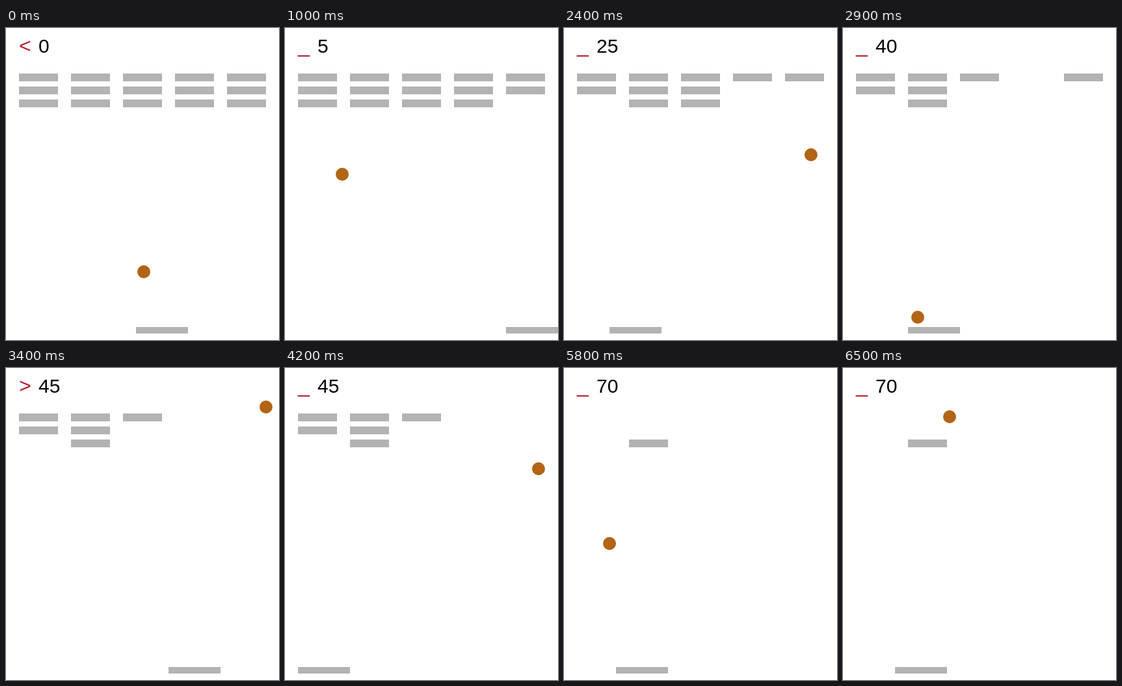
Recreate the animation shown at these times as an HTML page with a canvas. Size 420 by 480 pixels, loop 6.6 s.

```html
<!DOCTYPE html>
<html lang="en">
<head>
<meta charset="utf-8">
<title>Brick game</title>
<style>
  html, body { margin: 0; width: 420px; height: 480px; overflow: hidden; background: #fff; }
  canvas { display: block; }
</style>
</head>
<body>
<canvas id="stage" width="420" height="480"></canvas>
<script>
const ctx = document.getElementById('stage').getContext('2d');
const W = 420, H = 480, R = 10;
const STEP = 100, STEPS = 66, TICKS = 20, DELAY = 8;
const GREY = '#b3b3b3', BALL = '#b36415', RED = '#b22230';
const BRICK = { w: 60, h: 12 };

// Sideways speed the bat gives the ball at each return
const returns = [2.305, -4.89, 2, 5, -5, 5, -2, 5];

// The player's moves: [step, where the bat goes]
const BAT_SPEED = 60;
const moves = [
  [0, 160], [3, 300], [8.5, 340], [12, 300], [17, 120], [21.6, 70],
  [26, 100], [31.5, 260], [34.2, 0], [38.6, 20], [47.5, 120], [57, 80]
];

function batAt(t) {
  let x = 200;
  for (const [start, goal] of moves) {
    if (t < start) break;
    const dir = Math.sign(goal - x), run = (t - start) * BAT_SPEED;
    if (run < Math.abs(goal - x)) return { x: Math.round((x + dir * run) / 10) * 10, dir };
    x = goal;
  }
  return { x, dir: 0 };
}

function newGame() {
  const bricks = [];
  for (let r = 0; r < 3; r++)
    for (let c = 0; c < 5; c++) bricks.push({ x: 20 + 80 * c, y: 70 + 20 * r });
  return { x: 212, y: 375, vx: -0.2, vy: 5, bricks, score: 0, returned: 0 };
}

function touches(ball, brick) {
  return ball.x > brick.x - R && ball.x < brick.x + BRICK.w + R &&
         ball.y > brick.y - R && ball.y < brick.y + BRICK.h + R;
}

// At a wall the ball turns instead of moving along that axis.
function advance(g) {
  const x = g.x + g.vx, y = g.y + g.vy;
  if (x < R || x > W - R) g.vx *= -1; else g.x = x;
  if (y < R) g.vy *= -1; else g.y = y;

  g.bricks = g.bricks.filter(brick => {
    if (!touches(g, brick)) return true;
    g.vy *= -1;
    g.score += 5;
    return false;
  });

  if (g.y >= 455) {
    g.vy = -5;
    g.vx = returns[g.returned++];
    g.x = Math.round(g.x);
  }
}

// Play once and keep the state at every step.
const game = newGame();
const states = [];
for (let tick = -DELAY; states.length < STEPS; tick++) {
  if (tick > 0) advance(game);
  if ((tick + DELAY) % TICKS === 0) states.push({ ...game });
}

function text(string, x, size, color) {
  ctx.font = `${size}px "Liberation Sans", Arial, sans-serif`;
  ctx.fillStyle = color;
  ctx.fillText(string, x, 38);
}

function draw(step) {
  const { x, y, bricks, score } = states[step];
  const bat = batAt(step);
  ctx.fillStyle = '#fff';
  ctx.fillRect(0, 0, W, H);

  ctx.fillStyle = GREY;
  for (const b of bricks) ctx.fillRect(b.x, b.y, BRICK.w, BRICK.h);
  ctx.fillRect(bat.x, 460, 80, 10);

  ctx.fillStyle = BALL;
  ctx.beginPath();
  ctx.arc(Math.round(x), y, R, 0, 2 * Math.PI);
  ctx.fill();

  text('<_>'[bat.dir + 1], 20, 32, RED);
  text(score, 50, 30, '#000');
}

function frame() {
  draw(Math.floor(performance.now() / STEP) % STEPS);
  requestAnimationFrame(frame);
}
frame();
</script>
</body>
</html>
```
